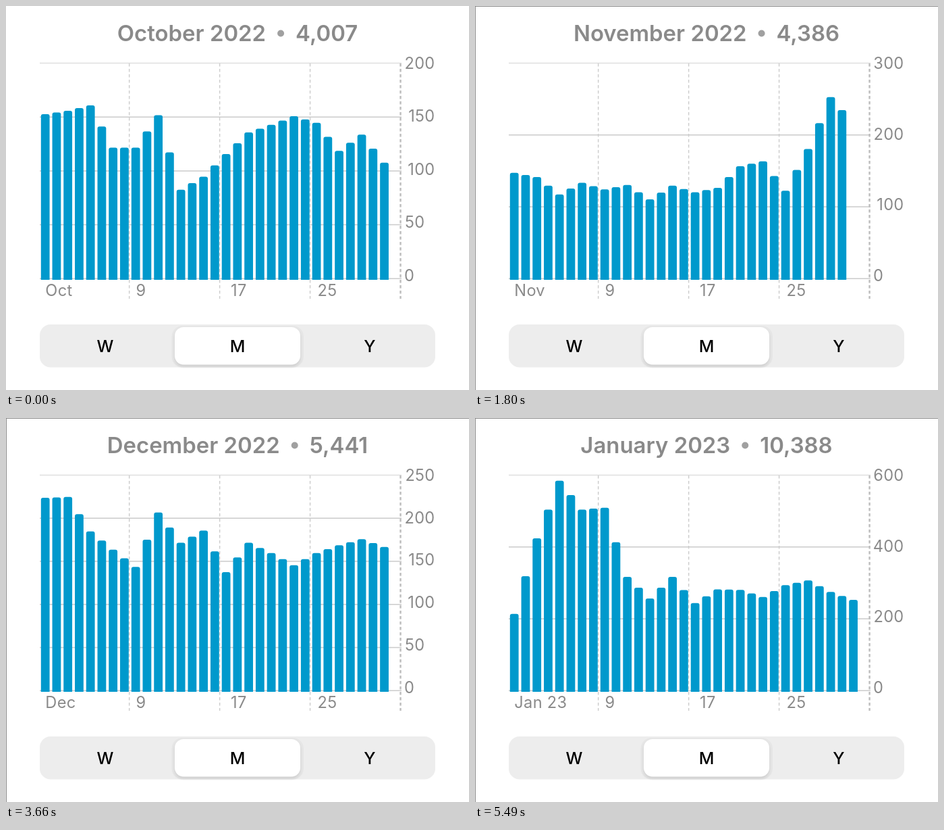
Write an HTML page with a canvas that moves like this. It is 686 px wide and 568 px high and loops after 7.77 s.

```html
<!DOCTYPE html>
<html lang="en">
<head>
<meta charset="utf-8">
<title>Monthly chart</title>
<style>
  html, body { margin: 0; width: 100%; height: 100%; overflow: hidden; background: #fff; }
  canvas { display: block; }
</style>
</head>
<body>
<canvas id="stage" width="686" height="568"></canvas>
<script>
const ctx = document.getElementById('stage').getContext('2d');
const LOOP = 7770, STEP = 30;
const LEFT = 50, RIGHT = 586, TOP = 84.5, BASE = 403.3;
const ORIGIN = 48.7, DAY = 16.745, PAGE = DAY * 32;
const GREY = '#8a8a8a', BLUE = '#0099cc';
const FONT = 'Inter, "Open Sans", sans-serif';

// trend: the curve through every second day
const months = [
  { tag: 'Oct', name: 'October 2022', total: '4,007', max: 200, tick: 50, days: 31,
    trend: [153, 156, 161, 122, 122, 152, 83, 95, 116, 136, 143, 151, 145, 119, 134, 108] },
  { tag: 'Nov', name: 'November 2022', total: '4,386', max: 300, tick: 100, days: 30,
    trend: [148, 142, 118, 134, 125, 131, 111, 130, 121, 127, 157, 164, 123, 181, 253, 217] },
  { tag: 'Dec', name: 'December 2022', total: '5,441', max: 250, tick: 50, days: 31,
    trend: [224, 225, 185, 164, 144, 207, 172, 186, 138, 172, 160, 146, 160, 169, 176, 167] },
  { tag: 'Jan 23', name: 'January 2023', total: '10,388', max: 600, tick: 200, days: 31,
    trend: [215, 425, 585, 505, 510, 318, 258, 318, 245, 283, 282, 262, 295, 308, 276, 254] },
  { tag: 'Feb', days: 0 }
];

// Each swipe: a finger drag, then a critically damped settle. Each rescale: start and end.
const swipes = [
  { start: 285, drag: 150, part: 0.1, rate: 0.0145 },
  { start: 2498, drag: 0, part: 0, rate: 0.0134 },
  { start: 4450, drag: 240, part: 0.185, rate: 0.0162 }
];
const rescales = [[1080, 1470], [3270, 3390], [5220, 5490]];

function swiped(t, { start, drag, part, rate }) {
  const u = t - start;
  if (u <= 0) return 0;
  if (u < drag) return part * (u / drag) ** 2;
  const left = 1 - part, s = u - drag;
  const push = rate * left - (drag ? 2 * part / drag : 0);
  return 1 - (left + push * s) * Math.exp(-rate * s);
}

function eased(t, [from, to]) {
  const p = Math.min(1, Math.max(0, (t - from) / (to - from)));
  return p * p * (3 - 2 * p);
}

const dayValue = ({ trend }, i) => (trend[Math.floor(i / 2)] + trend[Math.ceil(i / 2)]) / 2;

function style(size, weight = 400, spacing = 0, color = GREY) {
  ctx.font = `${weight} ${size}px ${FONT}`;
  ctx.letterSpacing = spacing + 'px';
  ctx.fillStyle = color;
}

function text(str, x, y, align = 'left') {
  ctx.textAlign = align;
  ctx.fillText(str, x, y);
}

// Digits end where equally wide figures would end
function label(str, x, y) {
  style(23.6, 400, 0.3);
  if (isNaN(str)) text(str, x, y);
  else text(str, x + ctx.measureText('0'.repeat(str.length)).width, y, 'right');
}

function box(x, y, w, h, r, color) {
  ctx.fillStyle = color;
  ctx.beginPath();
  ctx.roundRect(x, y, w, h, r);
  ctx.fill();
}

function line(x1, y1, x2, y2, width, color) {
  ctx.lineWidth = width;
  ctx.strokeStyle = color;
  ctx.beginPath();
  ctx.moveTo(x1, y1);
  ctx.lineTo(x2, y2);
  ctx.stroke();
}

function heading({ name, total }, alpha) {
  const gap = 44;
  ctx.globalAlpha = alpha;
  style(32.9, 600);
  const w = ctx.measureText(name).width;
  const x = 343 - (w + gap + ctx.measureText(total).width) / 2;
  text(name, x, 52);
  text(total, x + w + gap, 52);
  box(x + w + gap / 2 - 5, 35.5, 10, 10, 5, '#a0a0a0');
  ctx.globalAlpha = 1;
}

function ticks(from, to, p, max) {
  const list = m => Array.from({ length: m.max / m.tick + 1 }, (_, i) => i * m.tick);
  const before = list(from), after = list(to);
  for (const v of new Set([...before, ...after])) {
    const f = v / max;
    if (f > 1.01) continue;
    ctx.globalAlpha = (before.includes(v) ? 1 - p : 0) + (after.includes(v) ? p : 0);
    const y = BASE - (BASE - TOP) * f;
    line(LEFT, y, RIGHT, y, 1.5, f > 0.99 ? '#dedede' : '#cbcbcb');
    label(String(v), 590, 406.5 - 313.5 * f);
  }
  ctx.globalAlpha = 1;
}

function page(month, x, max, joined) {
  ctx.setLineDash([4.5, 3.5]);
  for (let w = 0; w < 4; w++) {
    const lx = x + w * 8 * DAY, thick = !w && joined;
    line(lx, 85, lx, 433, thick ? 2.4 : 1.5, thick ? '#bdbdbd' : '#cdcdcd');
    label(w ? String(w * 8 + 1) : month.tag, lx + 9.6, 428.5);
  }
  ctx.setLineDash([]);
  for (let i = 0; i < month.days; i++) {
    const h = Math.min(1, dayValue(month, i) / max) * 319.5;
    box(x + 3.1 + i * DAY, 404.3 - h, 12.8, h + 0.7, [3, 3, 0, 0], BLUE);
  }
}

function picker() {
  box(50, 471, 586, 63.5, 16, '#ededed');
  box(245.5, 473, 195.5, 61.5, 16, '#e6e6e6');
  ctx.save();
  ctx.shadowColor = 'rgba(0,0,0,.1)';
  ctx.shadowBlur = 4;
  ctx.shadowOffsetY = 3;
  box(250, 475, 186, 55.5, 13, '#fff');
  ctx.restore();
  style(24.8, 500, 0, '#000');
  ['W', 'M', 'Y'].forEach((c, i) => text(c, 147 + 196 * i, 512, 'center'));
}

function draw(now) {
  const t = Math.floor(now % LOOP / STEP) * STEP;
  const scroll = swipes.reduce((sum, s) => sum + swiped(t, s), 0) * PAGE;
  const k = rescales.filter(r => t >= r[1]).length;
  const from = months[k], to = months[Math.min(k + 1, 3)];
  const p = k < 3 ? eased(t, rescales[k]) : 0;
  const max = from.max + (to.max - from.max) * p;

  ctx.fillStyle = '#fff';
  ctx.fillRect(0, 0, 686, 568);
  heading(from, 1 - p);
  if (p > 0) heading(to, p);
  ticks(from, to, p, max);

  ctx.save();
  ctx.beginPath();
  ctx.rect(LEFT, 0, RIGHT - LEFT, 568);
  ctx.clip();
  months.forEach((m, i) => {
    const x = ORIGIN + i * PAGE - scroll;
    if (x < RIGHT && x > LEFT - PAGE - 5) page(m, x, max, i !== 2 || t >= 1110);
  });
  ctx.restore();

  picker();
  if (t >= 300) {
    line(0, 0.5, 686, 0.5, 1, '#8c8c8c');
    line(0.5, 0, 0.5, 568, 1, '#8c8c8c');
  }
  requestAnimationFrame(draw);
}
requestAnimationFrame(draw);
</script>
</body>
</html>
```
